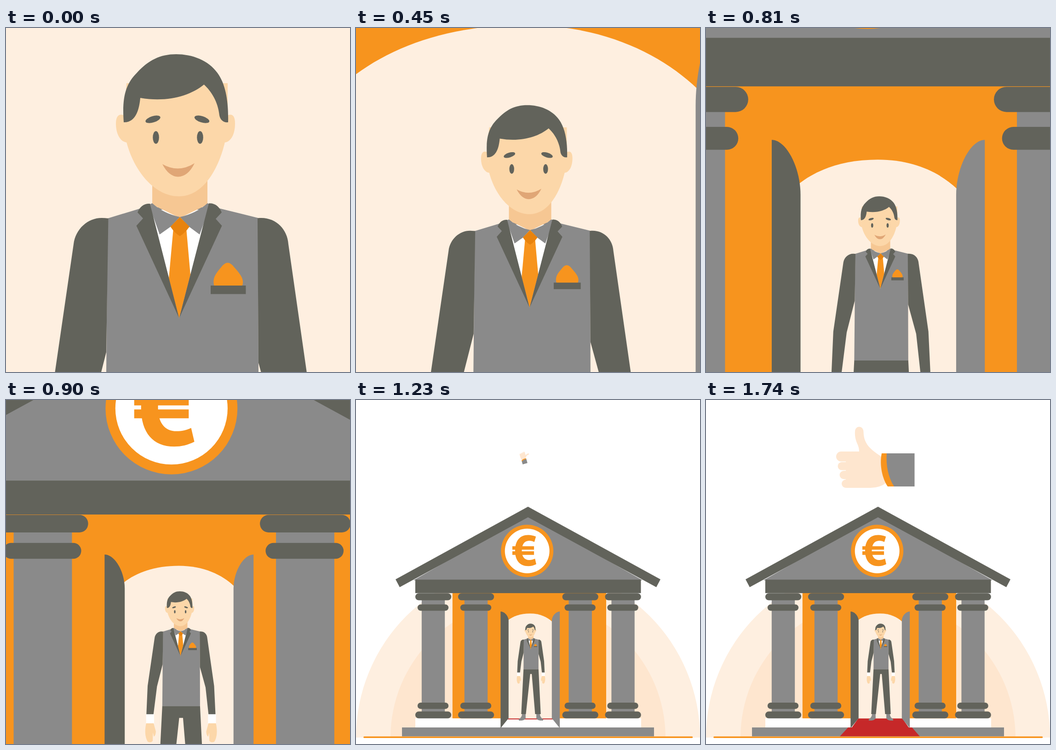
Recreate the animation shown at these times as an HTML page. Size 748 px wide and 748 px high, loop 3420 ms.

```html
<!DOCTYPE html>
<html lang="en">
<head>
<meta charset="utf-8">
<title>Banker</title>
<style>
html, body { margin: 0; width: 100%; height: 100%; overflow: hidden; background: #fff; }
svg { display: block; width: 100vw; height: 100vh; }
.dark { fill: #62635b; }
.gray { fill: #8a8a8a; }
.orange { fill: #f7941e; }
.cream { fill: #feefe0; }
.peach { fill: #fee6cf; }
.skin { fill: #fcd7a9; }
.white { fill: #fff; }
.red { fill: #c62829; }
</style>
</head>
<body>
<svg viewBox="0 0 748 748">
  <defs>
    <clipPath id="unroll"><rect id="reveal" x="280" y="690" width="200" height="0"/></clipPath>
    <g id="column">
      <rect class="gray" x="142.8" y="425" width="50.4" height="262"/>
      <g class="dark">
        <rect x="128.9" y="420.2" width="78.3" height="15.2" rx="7.6"/>
        <rect x="133.8" y="444.4" width="67.4" height="13.8" rx="6.9"/>
        <rect x="133.8" y="658" width="67.4" height="13.7" rx="6.8"/>
        <rect x="128.9" y="677.2" width="78.3" height="15" rx="7.5"/>
      </g>
    </g>
    <g id="limb">
      <rect class="white" x="72" y="1145" width="70" height="85"/>
      <path class="skin" d="M72 1228H138L158 1300Q156 1340 140 1345L132 1310L130 1385Q110 1405 85 1390Q50 1330 72 1228Z"/>
      <path class="gray" d="M185 2070H262V2170Q230 2220 170 2220H112Q95 2200 130 2178Q172 2150 185 2070Z"/>
    </g>
  </defs>

  <path class="cream" d="M0 734A374 374 0 0 1 748 734Z"/>
  <path class="peach" d="M75 734A299 299 0 0 1 673 734Z"/>
  <path d="M18 733.3H730.5" stroke="#f7941e" stroke-width="3.6" stroke-linecap="round"/>

  <g id="scene">
    <rect class="gray" x="100" y="712" width="548" height="19.3"/>
    <rect class="white" x="129" y="692" width="491" height="20"/>
    <rect class="orange" x="209.8" y="415" width="334.2" height="277.2"/>
    <path class="cream" d="M331 692.5V478.6C342 470 358 464.2 378.5 464.2C400 464.2 416 472 426.3 481.8V692.5Z"/>
    <g class="red" clip-path="url(#unroll)">
      <path d="M331 692.5H427L441 712.3H317Z"/>
      <path d="M309 712H448L465 731.5H291Z"/>
    </g>
    <path id="doorL" class="dark"/>
    <path id="doorR" class="gray"/>

    <g id="man">
      <use href="#limb"/>
      <use href="#limb" transform="matrix(-1 0 0 1 763 0)"/>
      <path class="dark" d="M215 1074H550L600 2078H474L399 1180H365L268 2078H164Z"/>
      <path class="gray" d="M221 414L300 390H455L548 413L549 748L550 1076H215L218 748Z"/>
      <path class="dark" d="M222.500 414Q215 413 208 413C178 413 151 437 147 470L85 896L74 1147H137L168 902L218 705Z"/>
      <path class="dark" d="M547 413.500C585 409 612 437 614 470L675 896L687 1147H625L599 910L549 728Z"/>

      <path class="white" d="M316 395H438L376.500 631Z"/>
      <path d="M318 330H438V384L378 413L318 384Z" fill="#f6c793"/>
      <path class="gray" d="M318 381Q342 403 378 411L358 432L334 449L311 384Z"/>
      <path class="gray" d="M438 381Q414 403 378 411L398 432L421 449L445 384Z"/>
      <path class="orange" d="M364 435L354 545L376.500 631L401 537L392 435Z"/>
      <path d="M378 411L399 432Q389 446 378 452.500Q367 446 357.500 432Z" fill="#e8830e"/>
      <path class="dark" d="M313 382C301 381 291 388 286 401L298 414L283.500 430L376.500 631Z"/>
      <path class="dark" d="M441 381.500C453 380 464 388 469 401L456 415L469.500 430L376.500 631Z"/>
      <path class="orange" d="M453 562C448 545 455 535 468 520Q482 501 496 520C512 538 519 548 513 562Z"/>
      <rect class="dark" x="445" y="560" width="76.500" height="18.500"/>

      <path class="skin" d="M256 190C244 185 239 194 239 208C239 232 250 249 264 249Z"/>
      <path class="skin" d="M482 190C494 185 498 194 498 208C498 232 488 249 474 249Z"/>
      <path class="skin" d="M257 190L262 248C278 310 322 366 376 366C432 366 464 300 476 248L482 190V120H262Z"/>
      <path class="dark" d="M256 205C252 150 260 122 285 97C310 70 335 57 370 57C405 57 440 70 460 98C478 123 484 160 483 205C474 206 466 201 464 190C461 160 446 137 430.500 123C400 148 350 162 292 152C290 175 283 206 256 205Z"/>
      <g class="dark">
        <ellipse cx="319.500" cy="198.500" rx="16.800" ry="6.800" transform="rotate(-17 319.500 198.500)"/>
        <ellipse cx="426" cy="198.500" rx="16.800" ry="6.800" transform="rotate(17 426 198.500)"/>
        <ellipse cx="326" cy="238" rx="6.800" ry="13.700"/>
        <ellipse cx="422" cy="238" rx="6.800" ry="13.700"/>
      </g>
      <path d="M340 296Q375 316 410 294Q396 323 374 323.500Q354 323 340 296Z" fill="#e0a676"/>
    </g>

    <use href="#column"/>
    <use href="#column" x="93"/>
    <use href="#column" x="319.7"/>
    <use href="#column" x="412.6"/>
    <path class="gray" d="M374 250L125 392H623Z"/>
    <path class="dark" d="M374 232L662 390L653 407L374 255L95 407L86 390Z"/>
    <rect class="dark" x="128.9" y="390.600" width="490.600" height="29.300"/>
    <circle class="orange" cx="372.2" cy="328.2" r="57"/>
    <circle class="white" cx="372.2" cy="328.2" r="48.500"/>
    <g class="orange" transform="translate(114.87 160.85) scale(.698)">
      <path d="M396 195C388 192 380 190 372 190C346 190 331 208 331 239C331 270 346 287 372 287C381 287 389 285 397 281L393 264C387 267 381 268 375 268C360 268 352 257 352 239C352 220 360 208 375 208C381 208 387 210 391 212Z"/>
      <path d="M322.500 225H390V236H322.500ZM322.500 241H390V252H322.500Z"/>
    </g>
  </g>

  <g id="thumb">
    <g class="peach">
      <rect x="283" y="112" width="62" height="21.800" rx="10.900"/>
      <rect x="286.500" y="135" width="60" height="17.500" rx="8.700"/>
      <rect x="290.500" y="154" width="60" height="18" rx="9"/>
      <rect x="295" y="173" width="60" height="18" rx="9"/>
      <path d="M333 112Q333 103 328 93Q323 81 324 68C325 55 342 55 342.500 69C343 96 357 107 384 125L392 180Q378 191 358 191H304V113Z"/>
    </g>
    <path class="gray" d="M391 116H453.500V188H405Q388 150 391 116Z"/>
    <path class="orange" d="M382 116H393C391 141 396 168 409 188H395C383 170 377 141 382 116Z"/>
  </g>
</svg>
<script>
const LOOP = 3420, STEP = 30;
const FOCUS = [380.35, 532.6];
const zoomKeys = [[250, 10.27], [450, 7.88], [630, 5.74], [810, 3.6], [990, 1.433], [1020, 1]];
const doorKeys = [[630, 9.4], [810, 7.8], [990, 3.2], [1020, 0]];
const carpetKeys = [[1200, 692], [1440, 712.3], [1740, 731.5]];

const el = id => document.getElementById(id);
const set = (id, name, value) => el(id).setAttribute(name, value);

function track(keys, t) {
  if (t <= keys[0][0]) return keys[0][1];
  for (let i = 1; i < keys.length; i++) {
    const [t0, a] = keys[i - 1], [t1, b] = keys[i];
    if (t < t1) return a + (b - a) * (t - t0) / (t1 - t0);
  }
  return keys[keys.length - 1][1];
}

function zoom(k) {
  const [x, y] = FOCUS;
  return `translate(${x} ${y}) scale(${k}) translate(${-x} ${-y})`;
}

// lift raises the rounded top of a door
function door(outer, inner, lift) {
  const top = 460 - lift, side = 480 + lift * 0.7;
  const mid = outer + (inner - outer) * 0.5;
  return `M${outer} ${top}C${mid} ${top} ${inner} ${top + (side - top) * 0.5} ${inner} ${side}V692L${outer} 713.5Z`;
}

function draw(time) {
  const t = Math.floor(time % LOOP / STEP) * STEP;
  set('scene', 'transform', zoom(track(zoomKeys, t)));

  const lift = track(doorKeys, t);
  set('doorL', 'd', door(314.4, 331.8, lift));
  set('doorR', 'd', door(443.1, 425.8, lift));
  set('reveal', 'height', track(carpetKeys, t) - 690);

  const left = 1 - Math.min(1, Math.max(0, (t - 1200) / 540));
  const size = 1 - left ** 2.85, turn = 90 * left ** 3.4;
  set('thumb', 'transform', `translate(368 125) rotate(${turn}) scale(${size}) translate(-368 -125)`);
  el('thumb').style.display = size > 0 ? '' : 'none';
}

function tick() {
  draw(performance.now());
  requestAnimationFrame(tick);
}

set('man', 'transform', zoom(1 / zoomKeys[0][1]));
tick();
</script>
</body>
</html>
```
